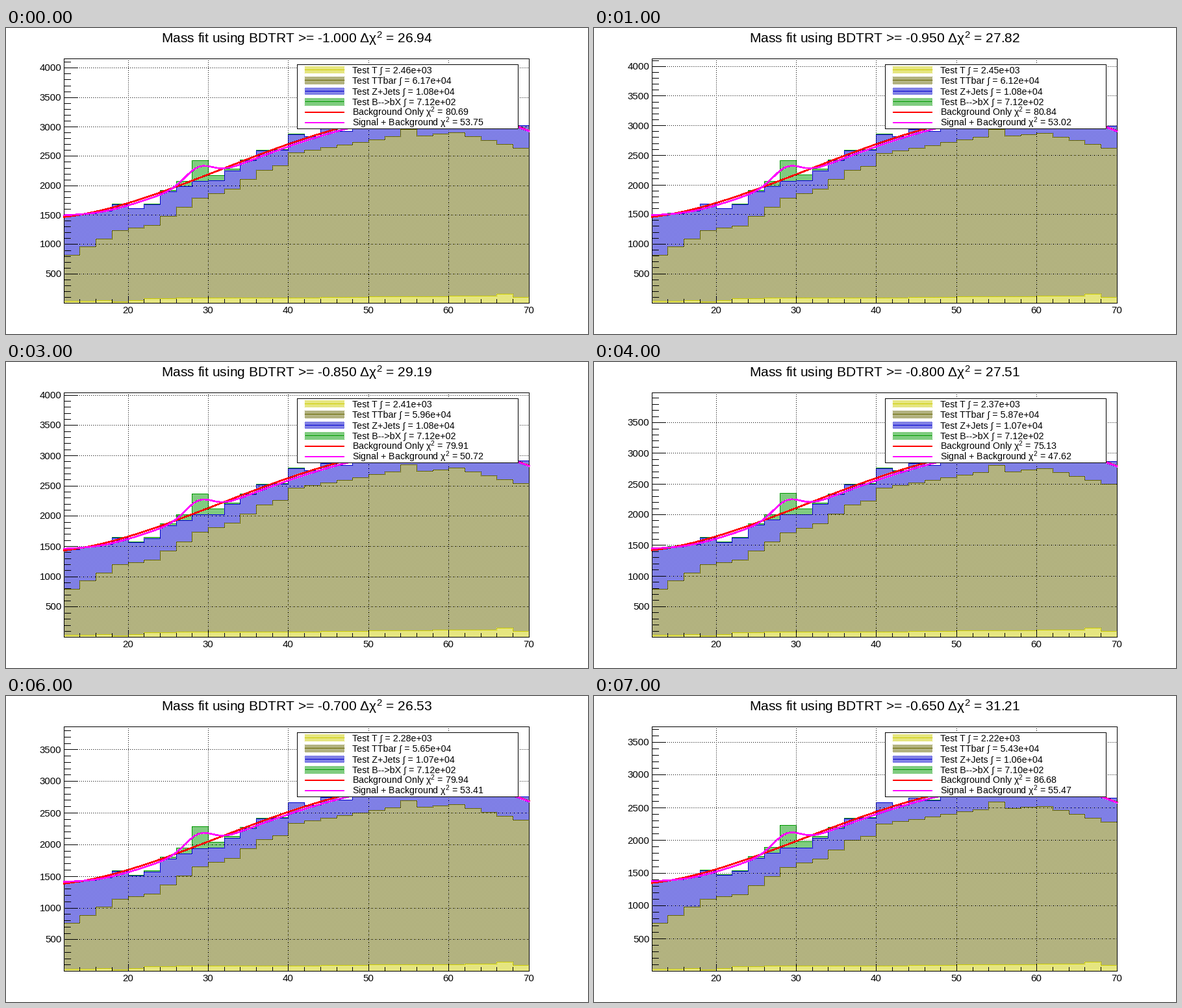
Write a matplotlib script that moves like this. It is 896 px wide and 472 px high and loops after 8 s.

```python
import numpy as np
import matplotlib as mpl
import matplotlib.pyplot as plt
from matplotlib.animation import FuncAnimation

mpl.rcParams.update({
    "font.family": "Liberation Sans",
    "mathtext.fontset": "custom",
    "mathtext.rm": "Liberation Sans",
})

W, H, DPI = 896, 472, 100
PX = 72 / DPI
LEFT, RIGHT, TOP, BASE = 89, 805, 47, 424
X0, X1, BINS = 12, 70, 29
BOX_L, BOX_R, BOX_T, BOX_B = 448, 788, 56, 155
CHI2 = r"$\mathrm{\chi^2}$"

COLORS = {"T": (204, 204, 0), "TTbar": (102, 102, 0),
          "Z+Jets": (0, 0, 204), "B-->bX": (0, 153, 0)}
RED, MAGENTA, BLACK = (255, 0, 0), (255, 0, 255), (0, 0, 0)

# Results of the scan over the cut
N_TTBAR = [61700, 61200, 61000, 59600, 58700, 57600, 56500, 54300]
CHI_BG = [80.69, 80.84, 80.79, 79.91, 75.13, 77.60, 79.94, 86.68]
CHI_SB = [53.75, 53.02, 52.18, 50.72, 47.62, 50.55, 53.41, 55.47]

yy, xx = np.mgrid[:H, :W]
CHECKER = (xx + yy) % 2 == 1
COL_BIN = np.clip((np.arange(W) - LEFT) * BINS // (RIGHT - LEFT), 0, BINS - 1)
bins = np.arange(BINS)
edges = X0 + 2 * np.arange(BINS + 1)

# Shapes at the loosest cut, as a few (bin, height) corners
ttbar_shape = np.interp(
    bins, [0, 3, 5, 8, 10, 12, 13, 14, 17, 20, 21, 22, 24, 28],
    [820, 1235, 1320, 1790, 1945, 2265, 2335, 2555, 2690, 2830, 2960, 2850,
     2900, 2640])
back_shape = np.interp(
    bins, [0, 2, 3, 4, 5, 6, 8, 9, 12, 13, 14, 15, 16, 17, 20, 28],
    [1485, 1567, 1682, 1607, 1676, 1895, 2075, 2085, 2592, 2607, 2872, 2832,
     2962, 2925, 3200, 3020])
t_shape = np.interp(bins, [0, 2, 3, 5, 8, 13, 21, 26, 27, 28],
                    [30, 50, 25, 75, 90, 85, 115, 120, 160, 100])
signal = 350 / (1 + ((bins - 8) / .6) ** 2)

# Fitted curves: a polynomial, then with a resonance on top
mass = np.linspace(X0, X1, 101)
poly = np.polyfit(np.array([12, 20, 30, 40, 50, 62, 70]) - 41,
                  [1465, 1700, 2190, 2700, 3095, 3200, 2930], 5)
fit = np.polyval(poly, mass - 41)
dip = 42 * np.tanh((mass - 14.5) / 3) * np.clip((72 - mass) / 20, 0, 1)
bump = 235 * np.exp(-.5 * ((mass - 28.8) / 1.7) ** 2)

fig = plt.figure(figsize=(W / DPI, H / DPI), dpi=DPI, facecolor="white")
ax = fig.add_axes([0, 0, 1, 1])


def px(v):
    return LEFT + (np.asarray(v) - X0) * (RIGHT - LEFT) / (X1 - X0)


def pixel(v):
    return np.floor(v + .3).astype(int)


def shrink(x, w, loss, tilt):
    """Share of events left; heavier masses lose a little more."""
    return 1 - w * (loss + tilt * (x - X0) / (X1 - X0))


def hatch(canvas, mask, color):
    canvas[mask] = np.where(CHECKER[mask][:, None], color, 255)


def outline(canvas, rows, color):
    cols = pixel(px(edges))
    for b, row in enumerate(rows):
        canvas[row, cols[b]:cols[b + 1] + 1] = color
        if b:
            low, high = sorted((rows[b - 1], row))
            canvas[low:high + 1, cols[b]] = color


def frame_box(canvas, left, right, top, bottom):
    canvas[[top, bottom], left:right + 1] = BLACK
    canvas[top:bottom + 1, [left, right]] = BLACK


def curve(x, y, color):
    ax.plot(x, y, color=np.array(color) / 255, lw=1.6 * PX, antialiased=False)


def text(x, y, s, size, ha="left"):
    ax.text(x, y, s, fontsize=size * PX, ha=ha, va="baseline",
            color="black", zorder=5)


def show(image, left, top, zorder):
    h, w = image.shape[:2]
    ax.imshow(image, extent=(left, left + w, top + h, top), aspect="auto",
              interpolation="nearest", zorder=zorder)


def draw_axes(canvas, py, ymax):
    for v in range(100, int(ymax) + 1, 100):
        y, major = int(pixel(py(v))), v % 500 == 0
        if major:
            canvas[y, LEFT:RIGHT:3] = BLACK
            text(85.5, y + 5.5, str(v), 15, "right")
        canvas[y, LEFT:LEFT + (22 if major else 11)] = BLACK
    for v in range(X0 + 2, X1 + 1, 2):
        x, major = int(pixel(px(v))), v % 10 == 0
        if major:
            canvas[TOP:BASE:3, x] = BLACK
            text(x, 440, str(v), 15, "center")
        canvas[BASE - (11 if major else 6):BASE, x] = BLACK
    frame_box(canvas, LEFT, RIGHT, TOP, BASE)


def draw_legend(canvas, counts, chi_bg, chi_sb):
    canvas[BOX_T:BOX_B + 1, BOX_L:BOX_R + 1] = 255
    frame_box(canvas, BOX_L, BOX_R, BOX_T, BOX_B)
    rows = [(f"Test {name} ∫ = {n:.2e}", COLORS[name], True)
            for name, n in counts.items()]
    rows += [(f"Background Only {CHI2} = {chi_bg:.2f}", RED, False),
             (f"Signal + Background {CHI2} = {chi_sb:.2f}", MAGENTA, False)]
    for k, (label, color, filled) in enumerate(rows):
        mid = 64 + 16.5 * k
        y = int(mid)
        if filled:
            swatch = (abs(yy - mid) <= 5.5) & (xx >= 460) & (xx <= 520)
            hatch(canvas, swatch, color)
            canvas[y, 460:521] = color
        else:
            canvas[y - 1:y + 1, 460:521] = color
        text(533, mid + 4.8, label, 14.2)


def draw(k):
    w = (N_TTBAR[0] - N_TTBAR[k]) / (N_TTBAR[0] - N_TTBAR[-1])
    ymax = 4160 - 422 * w
    n_t = 2464.8 - 6.5 * k - 4 * k ** 2
    counts = {"T": n_t, "TTbar": N_TTBAR[k], "Z+Jets": 10800 - 3.5 * k ** 2,
              "B-->bX": 712.4 - 2.4 * (k / 7) ** 12}

    def py(v):
        return 424.4 - np.asarray(v) * (424.4 - TOP) / ymax

    ax.clear()
    ax.set_axis_off()
    canvas = np.full((H, W, 3), 255, np.uint8)

    # Stacked histograms, tallest first
    center = edges[:-1] + 1
    back = back_shape * shrink(center, w, .08, .045)
    stack = {"B-->bX": back + signal, "Z+Jets": back,
             "TTbar": ttbar_shape * shrink(center, w, .105, .03),
             "T": t_shape * n_t / 2460}
    inside = (xx >= LEFT) & (xx < RIGHT) & (yy < BASE)
    for name, heights in stack.items():
        rows = pixel(py(heights))
        hatch(canvas, inside & (yy >= rows[COL_BIN]), COLORS[name])
        outline(canvas, rows, COLORS[name])

    draw_axes(canvas, py, ymax)
    draw_legend(canvas, counts, CHI_BG[k], CHI_SB[k])
    show(canvas, 0, 0, 0)
    show(canvas[BOX_T:BOX_B + 1, BOX_L:BOX_R + 1], BOX_L, BOX_T, 3)

    level = shrink(mass, w, .08, .04)
    curve(px(mass), py(fit * level), RED)
    curve(px(mass), py((fit - dip + bump) * level), MAGENTA)

    text(448, 23, f"Mass fit using BDTRT >= {-1 + .05 * k:.3f} "
         + r"$\mathrm{\Delta\chi^2}$" + f" = {CHI_BG[k] - CHI_SB[k]:.2f}",
         21, "center")
    ax.set_xlim(0, W)
    ax.set_ylim(H, 0)
    return []


anim = FuncAnimation(fig, draw, frames=len(N_TTBAR), interval=1000,
                     init_func=lambda: draw(0), repeat=True, repeat_delay=0)
plt.show()
```
